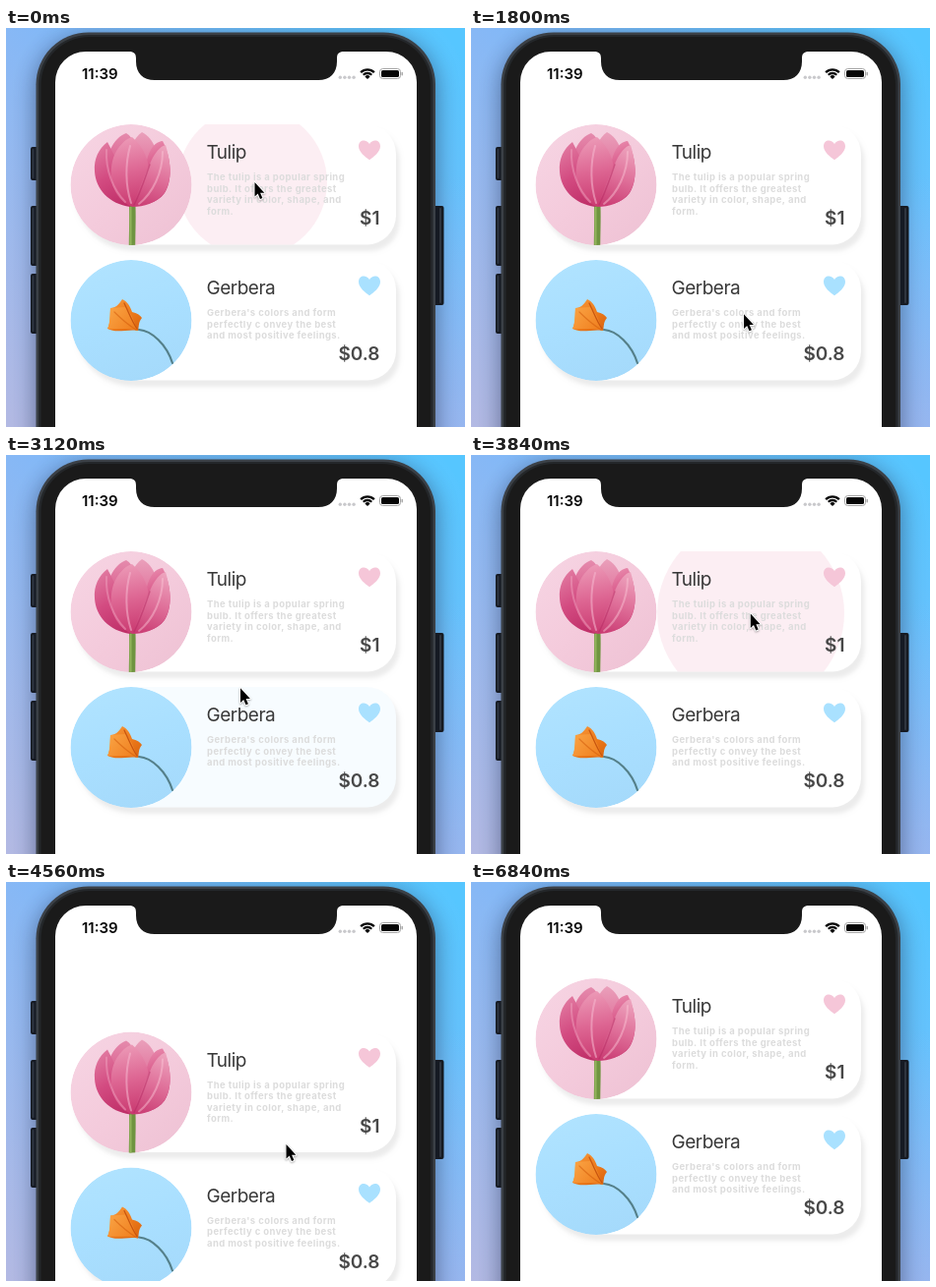
Write an HTML page with a canvas that moves like this. It is 466 by 406 pixels and loops after 7200 ms.

```html
<!DOCTYPE html>
<html lang="en">
<head>
<meta charset="utf-8">
<title>Flower shop</title>
<style>
html, body { margin: 0; width: 100%; height: 100%; overflow: hidden; }
canvas { display: block; width: 466px; height: 406px; }
</style>
</head>
<body>
<canvas id="stage"></canvas>
<script>
const W = 466, H = 406, LOOP = 7200, STEP = 120;
const canvas = document.getElementById('stage');
const ctx = canvas.getContext('2d');
const dpr = window.devicePixelRatio || 1;
canvas.width = W * dpr;
canvas.height = H * dpr;

const FONT = 'Inter, Roboto, sans-serif';
const GAP = 138;

const cards = [
  { title: 'Tulip', price: '$1', tint: '#f5c6d8', splash: [245, 198, 216, 0.3], photo: tulip,
    lines: ['The tulip is a popular spring', 'bulb. It offers the greatest', 'variety in color, shape, and', 'form.'] },
  { title: 'Gerbera', price: '$0.8', tint: '#a9e1ff', splash: [168, 226, 255, 0.45], photo: poppy,
    lines: ["Gerbera's colors and form", 'perfectly c onvey the best', 'and most positive feelings.'] }
];

// Pointer stops: time, x, y
const stops = [
  [0, 252, 157], [540, 252, 157], [960, 278.5, 291.5], [1740, 278.5, 291.5],
  [2340, 208, 286.5], [2940, 208, 286.5], [3360, 283, 161.5], [4200, 283.5, 161.5],
  [4560, 284, 267], [5040, 285.5, 269.5]
];
const POINTER_END = 5520;
const RELEASE = 4600, PULL = 54.5;

const taps = [
  { start: -380, card: 0, x: 250, y: 157 },
  { start: 1020, card: 1, x: 279, y: 291 },
  { start: 2453, card: 1, x: 209, y: 288 },
  { start: 3365, card: 0, x: 284, y: 161 }
];
const HOLD = 480, SPREAD = 240;

const ease = u => u * u * (3 - 2 * u);

function pointerAt(t) {
  for (let i = 1; i < stops.length; i++) {
    const [t0, x0, y0] = stops[i - 1], [t1, x1, y1] = stops[i];
    if (t <= t1) {
      const u = ease((t - t0) / (t1 - t0));
      return { x: x0 + (x1 - x0) * u, y: y0 + (y1 - y0) * u };
    }
  }
  const last = stops[stops.length - 1];
  return { x: last[1], y: last[2] };
}

function scrollAt(t) {
  if (t < 4200 || t > 5300) return 0;
  if (t <= RELEASE) return Math.min(1, (pointerAt(t).y - 161.5) / 105.5) * PULL;
  const s = (t - RELEASE) * 0.0133;
  return PULL * (1 + s) * Math.exp(-s);
}

function box(x, y, w, h, r, fill) {
  ctx.beginPath();
  ctx.roundRect(x, y, w, h, r);
  ctx.fillStyle = fill;
  ctx.fill();
}

function disc(x, y, r, fill) {
  ctx.beginPath();
  ctx.arc(x, y, r, 0, Math.PI * 2);
  ctx.fillStyle = fill;
  ctx.fill();
}

function shape(d, fill) {
  ctx.fillStyle = fill;
  ctx.fill(new Path2D(d));
}

function line(d, stroke, width) {
  ctx.strokeStyle = stroke;
  ctx.lineWidth = width;
  ctx.stroke(new Path2D(d));
}

function fade(x0, y0, x1, y1, ...colors) {
  const g = ctx.createLinearGradient(x0, y0, x1, y1);
  colors.forEach((c, i) => g.addColorStop(i / (colors.length - 1), c));
  return g;
}

function text(str, x, y, size, weight, color, spacing = 0, align = 'left') {
  ctx.font = `${weight} ${size}px ${FONT}`;
  ctx.letterSpacing = spacing + 'px';
  ctx.textAlign = align;
  ctx.fillStyle = color;
  ctx.fillText(str, x, y);
}

function shadow(color, blur, x, y) {
  ctx.shadowColor = color;
  ctx.shadowBlur = blur * dpr;
  ctx.shadowOffsetX = x * dpr;
  ctx.shadowOffsetY = y * dpr;
}

function tulip() {
  disc(127, 159.5, 61.5, fade(80, 110, 175, 210, '#f6d3e2', '#f4cbdc', '#efc3d5'));
  line('M128 176 C129 190 128 205 128 224', '#6f9440', 6.5);
  line('M126.5 182 L126.5 222', '#93b45d', 2);
  // back petals
  shape('M101 160 C98 130 110 111 122 107 C130 112 134 121 134 160Z', fade(0, 107, 0, 160, '#e58bad', '#d5487e'));
  shape('M122 160 C121 125 130 112 138 106 C150 112 158 128 152 160Z', fade(0, 106, 0, 160, '#eaa0bb', '#dc5d8d'));
  shape('M140 165 C140 128 149 116 159 115 C166 128 171 152 161 168 C153 179 140 180 132 181Z', fade(140, 115, 160, 178, '#ea8fb0', '#d54d82', '#c93872'));
  // front petals
  shape('M126 182 C105 179 91 164 90 146 C89 133 94 123 103 116 C109 127 117 143 126 182Z', fade(90, 120, 124, 178, '#e27ca2', '#d34b81', '#bf2f68'));
  shape('M128 182 C108 174 103 151 109 132 C113 121 121 113 128 111 C140 121 147 137 145 154 C144 168 138 178 128 182Z', fade(118, 112, 132, 182, '#ec9ab7', '#dd6592', '#c9386f'));
  shape('M128 182 C134 167 140 151 147 136 C151 127 157 120 162 119 C168 139 169 158 159 170 C151 178 141 182 128 182Z', fade(158, 120, 136, 182, '#eda3bd', '#df6f99', '#ca3c73'));
  ctx.lineCap = 'round';
  line('M126 120 C121 138 121 160 127 178', 'rgba(246,185,207,.55)', 2);
  line('M102 124 C101 145 109 165 121 177', 'rgba(240,160,190,.5)', 2);
  line('M159 126 C159 147 149 168 135 179', 'rgba(250,200,215,.45)', 2);
  line('M146 139 C141 153 137 166 130 180', 'rgba(178,36,93,.45)', 1.5);
}

function poppy() {
  disc(127, 159.5, 61.5, fade(100, 98, 140, 220, '#b0e3ff', '#a9dfff', '#a5dafb'));
  ctx.lineCap = 'round';
  line('M135 169 C148 170 163 184 169 203', '#55808a', 2.2);
  shape('M118 138 C123 140 126 145 128 151 C133 152 136 154 138 157 C134 161 135 168 134 170 C124 168 112 173 103 168 C106 163 106 154 106 147 C111 147 115 143 118 138Z', fade(108, 140, 132, 172, '#f4963a', '#ee7b1b', '#d9640f'));
  shape('M106 147 C112 147 116 146 121 146 C128 152 130 162 134 170 C124 167 114 169 103 168 C106 163 105 154 106 147Z', fade(105, 148, 132, 170, '#f9a243', '#ef7d1c'));
  line('M120 142 C124 150 128 161 133 168', '#c9560f', 1.3);
  line('M110 151 C116 157 124 164 132 169', 'rgba(210,92,12,.55)', 1.2);
}

function heart(x, y, fill) {
  ctx.save();
  ctx.translate(x, y);
  shape('M0 10 C-4 7 -11 2 -11 -4 C-11 -11 -3 -11.5 0 -6.3 C3 -11.5 11 -11 11 -4 C11 2 4 7 0 10Z', fill);
  ctx.restore();
}

function ripple(tap, t, dy) {
  const age = t - tap.start;
  if (age <= 0 || age >= HOLD + SPREAD) return;
  const out = Math.max(0, (age - HOLD) / SPREAD);
  const r = 0.2 * Math.min(age, HOLD) + 144 * out;
  const [red, green, blue, a] = cards[tap.card].splash;
  disc(tap.x, tap.y - dy, r, `rgba(${red},${green},${blue},${a * (1 - out)})`);
}

function drawCard(card, i, t) {
  const dy = i * GAP;
  const corners = [61, 30, 30, 61];
  ctx.save();
  ctx.translate(0, dy);
  ctx.save();
  shadow('rgba(0,0,0,.075)', 4, 3.5, 6.5);
  box(66, 98, 330, 122.5, corners, '#fff');
  ctx.restore();

  ctx.save();
  ctx.beginPath();
  ctx.roundRect(66, 98, 330, 122.5, corners);
  ctx.clip();
  taps.filter(tap => tap.card === i).forEach(tap => ripple(tap, t, dy));
  ctx.restore();

  ctx.save();
  ctx.beginPath();
  ctx.arc(127, 159.5, 61.5, 0, Math.PI * 2);
  ctx.clip();
  card.photo();
  ctx.restore();

  text(card.title, 203.5, 133, 19, 400, '#383838', -0.5);
  card.lines.forEach((s, n) => text(s, 204, 155 + n * 11.6, 9.5, 700, '#dcdcdc', 0.4));
  text(card.price, 379.5, 200, 19, 600, '#484848', 0, 'right');
  heart(369, 124.3, card.tint);
  ctx.restore();
}

function backdrop() {
  ctx.fillStyle = fade(440, 0, 0, 406, '#56c6ff', '#83b8f7', '#b3b9e3');
  ctx.fillRect(0, 0, W, H);
  ctx.fillStyle = fade(0, 150, 0, H, 'rgba(150,180,242,0)', 'rgba(158,180,236,.75)');
  ctx.fillRect(400, 150, 66, H - 150);
}

function phone() {
  [[121, 34], [181, 61], [250, 61]].forEach(([y, h]) => {
    box(25, y, 10, h, 2, '#15181b');
    box(26.5, y + 2, 2, h - 4, 1, '#343a40');
  });
  box(432, 181, 12.5, 101, 2, '#15181b');
  box(440, 183, 2, 97, 1, '#343a40');
  ctx.save();
  shadow('rgba(20,30,60,.5)', 24, 0, 5);
  box(30.5, 4.5, 405.5, 500, 53, '#3b4046');
  ctx.restore();
  box(33, 7, 400.5, 500, 51, '#24272a');
  box(35.5, 9, 395.5, 500, 49, '#1a1a1a');
  box(50, 24, 367, 480, 31, '#fff');
}

function statusBar() {
  shape('M125 23 H343 V24 C338 24 336 26 336 31 V34 C336 46 329 53 317 53 H151 C139 53 132 46 132 34 V31 C132 26 130 24 125 24Z', '#1a1a1a');
  text('11:39', 77, 52, 15, 600, '#050505');
  for (let i = 0; i < 4; i++) disc(339.3 + i * 4.6, 50.2, 1.7, '#c9c9cc');
  ctx.lineCap = 'butt';
  [9.7, 6].forEach(r => {
    ctx.beginPath();
    ctx.arc(367, 52, r, -Math.PI * 0.75, -Math.PI * 0.25);
    ctx.strokeStyle = '#050505';
    ctx.lineWidth = 2.3;
    ctx.stroke();
  });
  shape('M367 52 L364.4 49.4 A3.7 3.7 0 0 1 369.6 49.4Z', '#050505');
  ctx.beginPath();
  ctx.roundRect(379.5, 41.5, 21, 10, 3);
  ctx.strokeStyle = '#a5a5a5';
  ctx.lineWidth = 1;
  ctx.stroke();
  box(381, 43, 18, 7, 1.6, '#050505');
  box(401.5, 44.8, 1.4, 3.6, 0.7, '#a5a5a5');
}

function pointer({ x, y }) {
  ctx.save();
  ctx.translate(x, y);
  const arrow = 'M0.5 0 V14.6 L3.7 11.6 L6 17 L8.4 16 L6.1 10.7 H10.4Z';
  ctx.lineJoin = 'round';
  shadow('rgba(0,0,0,.3)', 2, 0, 1);
  line(arrow, '#fff', 2);
  shadow('transparent', 0, 0, 0);
  shape(arrow, '#000');
  ctx.restore();
}

function draw(t) {
  ctx.setTransform(dpr, 0, 0, dpr, 0, 0);
  backdrop();
  phone();
  ctx.save();
  ctx.beginPath();
  ctx.roundRect(50, 24, 367, 480, 31);
  ctx.clip();
  ctx.translate(0, scrollAt(t));
  cards.forEach((card, i) => drawCard(card, i, t));
  ctx.restore();
  statusBar();
  if (t < POINTER_END) pointer(pointerAt(t));
}

const begin = performance.now();
function frame() {
  const t = (performance.now() - begin) % LOOP;
  draw(Math.floor(t / STEP) * STEP);
  requestAnimationFrame(frame);
}
frame();
</script>
</body>
</html>
```
